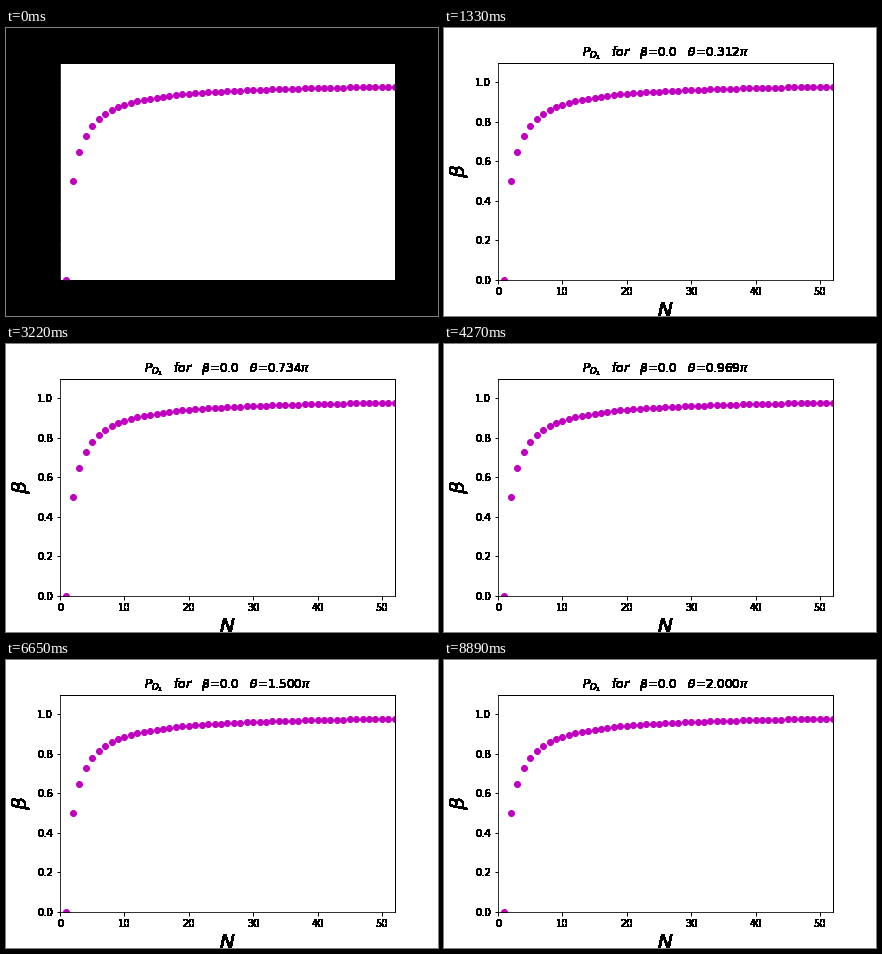
These frames come from a looping animation (432 px wide and 288 px high, 8960 ms). A matplotlib script:

```python
import numpy as np
import matplotlib.pyplot as plt
from matplotlib.animation import FuncAnimation
from matplotlib.patches import Rectangle

FRAMES, INTERVAL = 128, 70
W, H, DPI = 432, 288, 72


def harden(img, dpi):
    """Turn every touched pixel solid black, without soft edges."""
    out = np.zeros_like(img)
    out[..., 3] = img[..., 3] > 0
    return out, 0, 0


def threshold(n):
    return (n - 1) / (n + 0.18 * (n - 2) / np.maximum(n - 1, 1))


plt.rcParams.update({"font.family": "DejaVu Sans", "font.size": 10})
fig, ax = plt.subplots(figsize=(W / DPI, H / DPI), dpi=DPI, facecolor="white")
fig.subplots_adjust(left=0.125, right=0.9, bottom=0.125, top=0.88)

backdrop = fig.add_artist(Rectangle((0, 0), 1, 1, transform=fig.transFigure,
                                    facecolor="black", zorder=-1))

n = np.arange(1, 53)
beta = threshold(n)
beta[0] = 0
ax.plot(n, beta, "o", color="m", markersize=6)
ax.set_xlim(0, 52)
ax.set_ylim(0, 1.1)
ax.set_xticks(range(0, 51, 10))
ax.set_yticks(np.arange(6) / 5)
ax.tick_params(width=1)
for side in ("top", "right"):
    ax.spines[side].set_linewidth(1)

title = ax.set_title("", fontsize=12)
labels = [ax.set_xlabel("$N$", fontsize=20), ax.set_ylabel(r"$\beta$", fontsize=20)]
for text in [title, *labels, *ax.get_xticklabels(), *ax.get_yticklabels()]:
    text.set_agg_filter(harden)


def update(i):
    backdrop.set_visible(i == 0)
    theta = (i + 1) / 64
    title.set_text(rf"$P_{{O_1}}$   $for$   $\beta$=0.0   $\theta$={theta:.3f}$\pi$")
    return backdrop, title


anim = FuncAnimation(fig, update, frames=FRAMES, interval=INTERVAL,
                     repeat=True, repeat_delay=0, blit=False)
plt.show()
```
